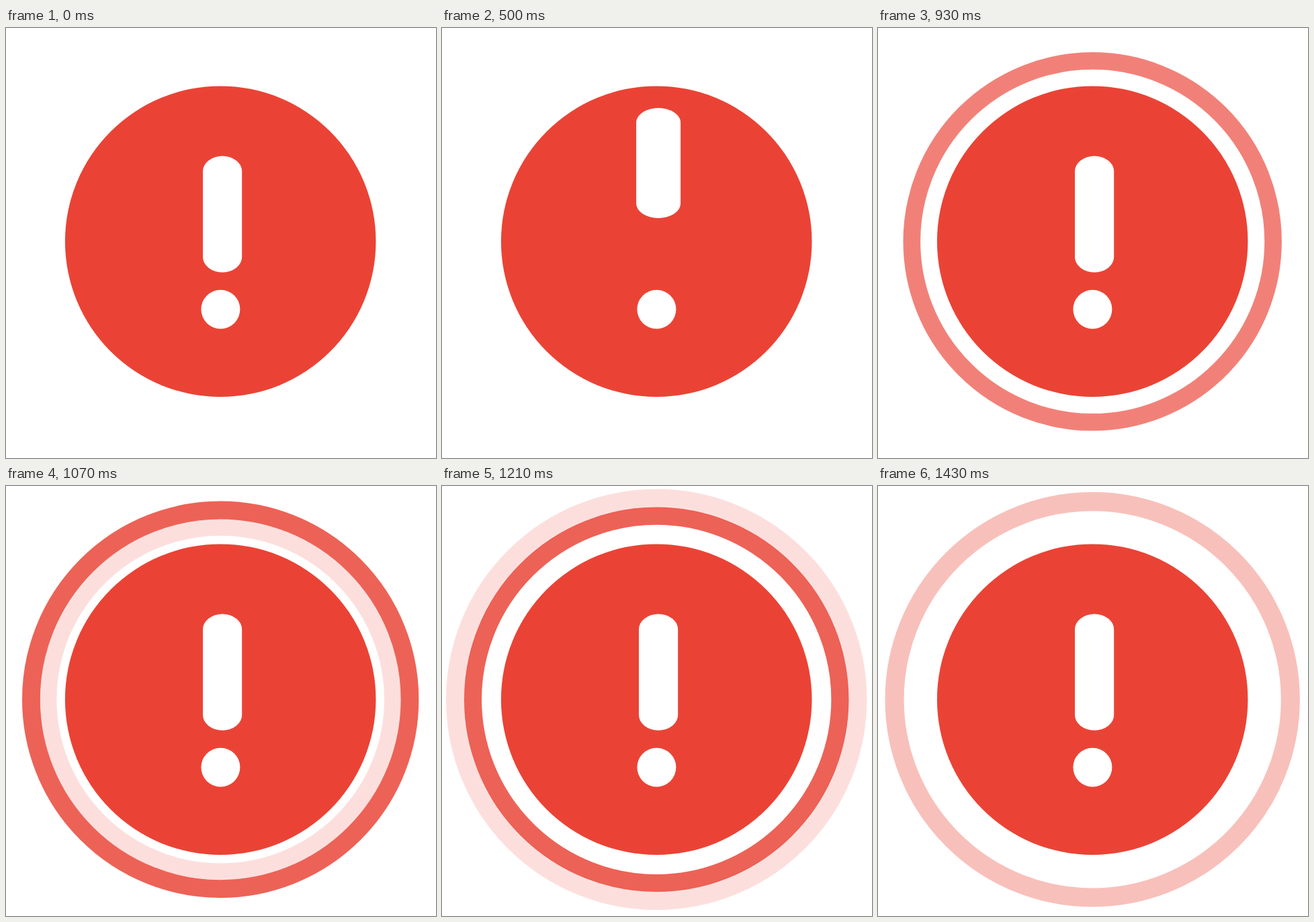
Recreate the animation shown at these times as an HTML page. Size 640x640 px, loop 1500 ms.

```html
<!DOCTYPE html>
<html lang="en">
<head>
<meta charset="utf-8">
<title>Alert</title>
<style>
  html, body { margin: 0; width: 100%; height: 100%; overflow: hidden; background: #fff; }
  svg { display: block; width: 100%; height: 100%; }
</style>
</head>
<body>
<svg viewBox="0 0 640 640">
  <g fill="none" stroke="#ea4335">
    <circle class="ring" cx="319.2" cy="317.8"/>
    <circle class="ring" cx="319.2" cy="317.8"/>
  </g>
  <circle cx="319.2" cy="317.7" r="231.3" fill="#ea4335"/>
  <circle cx="319.4" cy="418.7" r="29" fill="#fff"/>
  <rect id="bar" x="-29.1" y="-86.7" width="58.2" height="173.4" rx="29.1" ry="23" fill="#fff"/>
</svg>
<script>
const LOOP = 1500;
const RING_STARTS = [19, 25];
const RING_LIFE = 12;

// [tick, centre y, scale x, scale y]
const BAR_KEYS = [
  [0, 277.1, 1, 1],
  [3, 285.1, 1.135, 0.945],
  [12, 201, 1.135, 0.945],
  [19, 285.1, 1.135, 0.945],
  [22, 277.1, 1, 1],
  [36, 277.1, 1, 1]
];

const bar = document.getElementById('bar');
const rings = document.querySelectorAll('.ring');

function pose(keys, tick) {
  const i = keys.findIndex((key, n) => n > 0 && tick <= key[0]);
  const a = keys[i - 1], b = keys[i];
  const p = (tick - a[0]) / (b[0] - a[0]);
  return a.map((v, n) => v + (b[n] - v) * p);
}

// The picture is held at 14 steps per second, sampled from 36 ticks.
function tickAt(ms) {
  const step = Math.floor((Math.floor(ms / 10) * 10 + 5) * 0.014);
  return Math.round(step * 1.75);
}

function drawRing(ring, age) {
  const live = age > 0 && age < RING_LIFE;
  const outer = 263.7 + 4.5 * age;
  const width = outer * 0.091;
  ring.setAttribute('opacity', live ? 1 - Math.abs(age / 6 - 1) : 0);
  if (!live) return;
  ring.setAttribute('r', outer - width / 2);
  ring.setAttribute('stroke-width', width);
}

function draw() {
  const tick = tickAt(performance.now() % LOOP);
  const [, y, sx, sy] = pose(BAR_KEYS, tick);
  bar.setAttribute('transform', `translate(322.1 ${y}) scale(${sx} ${sy})`);
  rings.forEach((ring, i) => drawRing(ring, tick - RING_STARTS[i]));
  requestAnimationFrame(draw);
}

draw();
</script>
</body>
</html>
```
